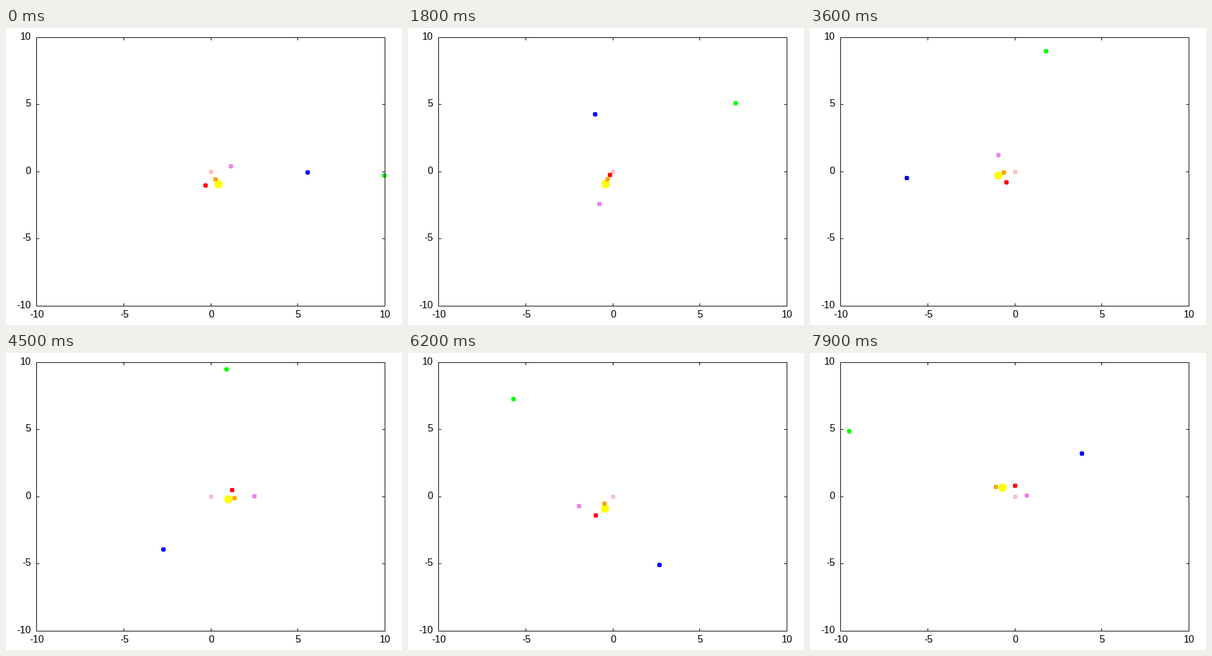
Write a matplotlib script that moves like this. It is 640 px wide and 480 px high and loops after 8000 ms.

```python
import numpy as np
import matplotlib.pyplot as plt
from matplotlib.animation import FuncAnimation
from matplotlib.patches import Circle

W, H, DPI = 640, 480, 80
FRAMES, INTERVAL = 80, 100
PX = 72 / DPI  # one pixel in points
FONT = 16  # pixels
LEFT, RIGHT, TOP, BOTTOM = 49, 612, 15, 449  # pixel columns and rows
LIMIT = 10
START = 2  # time of the first frame; every orbit has angle 0 at time 0

# orbits around the sun: colour, semi-major axis, eccentricity, degrees per frame
PLANETS = [
    ("#ffa500", 0.388, 0.0, 237.71),
    ("#ff0000", 0.723, 0.0, 93.45),
    ("#ee82ee", 1.511, -0.008, 30.81),
    ("#0000ff", 5.235, 0.0055, 4.80),
    ("#00ff00", 9.665, 0.0116, 1.90),
]
SUN_RATE = 57.23

fig = plt.figure(figsize=(W / DPI, H / DPI), dpi=DPI, facecolor="white")
ax = fig.add_axes([0, 0, 1, 1])
ax.set_xlim(0, W)
ax.set_ylim(H, 0)
ax.axis("off")


def line(x0, y0, x1, y1):
    """One pixel wide line through pixel centres, ends included."""
    ax.plot([x0 + 0.5, x1 + 0.5], [y0 + 0.5, y1 + 0.5], color="black", lw=PX,
            zorder=5, solid_capstyle="projecting", snap=False)


def label(x, y, value, align):
    """Text whose advance width is shifted left of x by the share align."""
    text = str(value)
    digits = len(text.lstrip("-"))
    width = FONT * (0.556 * digits + 0.333 * (value < 0))
    ax.text(x - align * width, y, text, ha="left", va="baseline",
            family="Liberation Sans", fontsize=FONT * PX, color="black")


def draw_frame_and_ticks():
    for y in (TOP, BOTTOM):
        line(LEFT, y, RIGHT, y)
    for x in (LEFT, RIGHT):
        line(x, TOP, x, BOTTOM)
    for i, value in enumerate(range(-LIMIT, LIMIT + 1, 5)):
        x = int(LEFT + (RIGHT - LEFT) * i / 4 + 0.5)
        y = int(BOTTOM - (BOTTOM - TOP) * i / 4)
        if 0 < i < 4:
            line(x, TOP, x, TOP + 4)
            line(x, BOTTOM, x, BOTTOM - 4)
            line(LEFT, y, LEFT + 4, y)
            line(RIGHT, y, RIGHT - 4, y)
        label(x + 1, 468, value, 0.5)
        label(40.5, y + 4, value, 1)


def dot(color, diameter):
    patch = Circle((0, 0), diameter / 2, facecolor=color, lw=0,
                   antialiased=False, zorder=3)
    return ax.add_patch(patch)


def place(patch, x, y):
    """Put a dot on the nearest pixel; hide it outside the plot range."""
    patch.set_center((np.round(330.9 + 28.15 * x) + 0.5,
                      np.round(232.1 - 21.7 * y) + 0.5))
    patch.set_visible(abs(x) <= LIMIT and abs(y) <= LIMIT)


def orbit(t, a, e, rate):
    mean = np.radians(rate * t)
    angle = mean + 2 * e * np.sin(mean)
    r = a * (1 - e * e) / (1 + e * np.cos(angle))
    return r * np.cos(angle), r * np.sin(angle)


draw_frame_and_ticks()
earth = dot("#ffc0c0", 6.15)
sun = dot("#ffff00", 12.15)
planets = [dot(p[0], 6.15) for p in PLANETS]
place(earth, 0, 0)


def update(n):
    t = n + START
    ex, ey = orbit(t, 1, 0, SUN_RATE)
    place(sun, -ex, -ey)
    for patch, (_, a, e, rate) in zip(planets, PLANETS):
        x, y = orbit(t, a, e, rate)
        place(patch, x - ex, y - ey)
    return [sun, *planets]


anim = FuncAnimation(fig, update, frames=FRAMES, interval=INTERVAL,
                     repeat=True, repeat_delay=0, blit=False)
plt.show()
```
